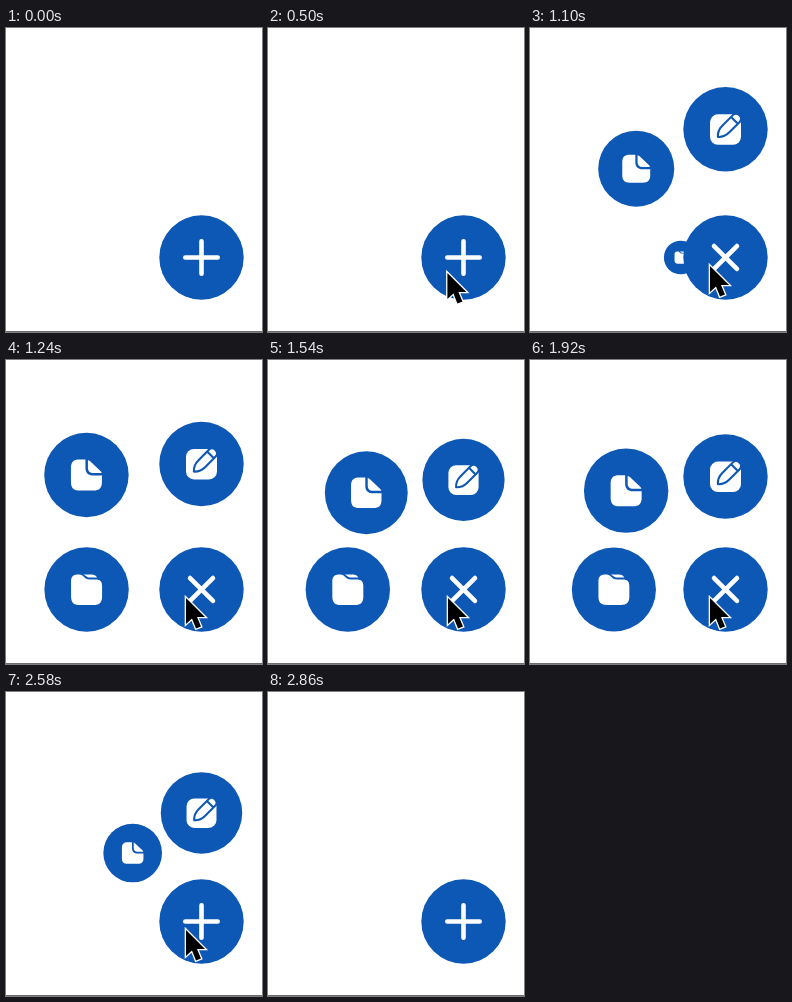
These frames come from a looping animation (256x304 px, 3990 ms). An HTML page:

```html
<!DOCTYPE html>
<html lang="en">
<head>
<meta charset="utf-8">
<title>Floating action menu</title>
<style>
  html, body { margin: 0; width: 100%; height: 100%; overflow: hidden; background: #fff; }
  svg { display: block; width: 256px; height: 304px; }
  .disc { fill: #0d57b5; }
  .icon { fill: #fff; }
  .pencil { stroke: #0d57b5; stroke-width: 2.1; stroke-linejoin: round; }
  #plus { stroke: #fff; stroke-width: 4.6; stroke-linecap: round; }
  #cursor { fill: #000; stroke: #fff; stroke-width: 2.6; paint-order: stroke; }
</style>
</head>
<body>
<svg viewBox="0 0 256 304">
  <path d="M0 303.5H256" stroke="#6c6c6c"/>
  <g transform="translate(195.5 229.5)">
    <g id="folder">
      <circle class="disc" r="42.2"/>
      <path class="icon" d="M-15.5-8.5C-15.5-13-13-15-8.5-15H-7.5C-5-15-4-14-2-12L-.5-10.8Q1-10 3-10H9C13.5-10 15.5-8 15.5-3.5V7C15.5 13 13 15.5 7 15.5H-7C-13 15.5-15.5 13-15.5 7Z
        M-3-15H5Q9-15 10.5-12H2.5Q1-12 0-13Z"/>
    </g>
    <g id="page">
      <circle class="disc" r="42.2"/>
      <path class="icon" d="M-15.5-7C-15.5-13-13-15.5-7-15.5H-1V-7C-1-2 2 .5 7 .5H15.5V7C15.5 13 13 15.5 7 15.5H-7C-13 15.5-15.5 13-15.5 7Z
        M1.5-15Q3-14.5 4-13.5L14-4Q15-3 15.3-2H7C3.5-2 1.5-4 1.5-7Z"/>
    </g>
    <g id="edit">
      <circle class="disc" r="42.2"/>
      <rect class="icon" x="-15.5" y="-15" width="31" height="30.5" rx="8"/>
      <path class="icon pencil" transform="translate(3 -3) rotate(45)"
        d="M0 15C-4 11.5-4.8 8-4.8 4V-11Q-4.8-15.5 0-15.5T4.8-11V4C4.8 8 4 11.5 0 15ZM-4.8-8.5H4.8"/>
    </g>
    <circle class="disc" r="42.2"/>
    <path id="plus" d="M-16.2 0H16.2M0-16.2V16.2"/>
  </g>
  <path id="cursor" d="M0 0V26L6 20.5L10 30.5L15 28.5L11 19H19Z"/>
</svg>
<script>
const LOOP = 3990;
const EXIT_DURATION = 350;
const items = [
  { id: 'edit', x: 0, y: -112.5, enter: 788, exit: 2349 },
  { id: 'page', x: -99, y: -98.5, enter: 888, exit: 2299 },
  { id: 'folder', x: -112, y: 0, enter: 990, exit: 2249 }
];

const place = (id, value) => document.getElementById(id).setAttribute('transform', value);
const progress = (t, start, duration) => Math.min(1, Math.max(0, (t - start) / duration));
const easeInOut = p => p * p * (3 - 2 * p);
const easeOut = p => 1 - (1 - p) ** 2;
const backIn = p => p * p * (2.73 * p - 1.73);

// Damped spring: stiffness 100, damping 10, mass 1.
function spring(ms) {
  if (ms <= 0) return 0;
  const s = ms / 1000, angle = Math.sqrt(75) * s;
  return 1 - Math.exp(-5 * s) * (Math.cos(angle) + Math.sin(angle) / Math.sqrt(3));
}

function render(t) {
  for (const { id, x, y, enter, exit } of items) {
    const p = spring(t - enter) * (1 - backIn(progress(t, exit, EXIT_DURATION)));
    const scale = Math.max(0, Math.min(1, p));
    place(id, `translate(${x * p} ${y * p}) scale(${scale})`);
  }

  const turn = easeInOut(progress(t, 790, 300)) - easeInOut(progress(t, 2290, 300));
  place('plus', `rotate(${45 * turn})`);

  const arrive = easeOut(progress(t, 285, 315));
  const leave = progress(t, 2800, 60);
  const cursorX = 174 + 6 * arrive - 16 * leave;
  const cursorY = 308 - 70 * arrive + 70 * leave ** 1.5;
  place('cursor', `translate(${cursorX} ${cursorY})`);
}

const start = performance.now();
function tick() {
  render((performance.now() - start) % LOOP);
  requestAnimationFrame(tick);
}
tick();
</script>
</body>
</html>
```
